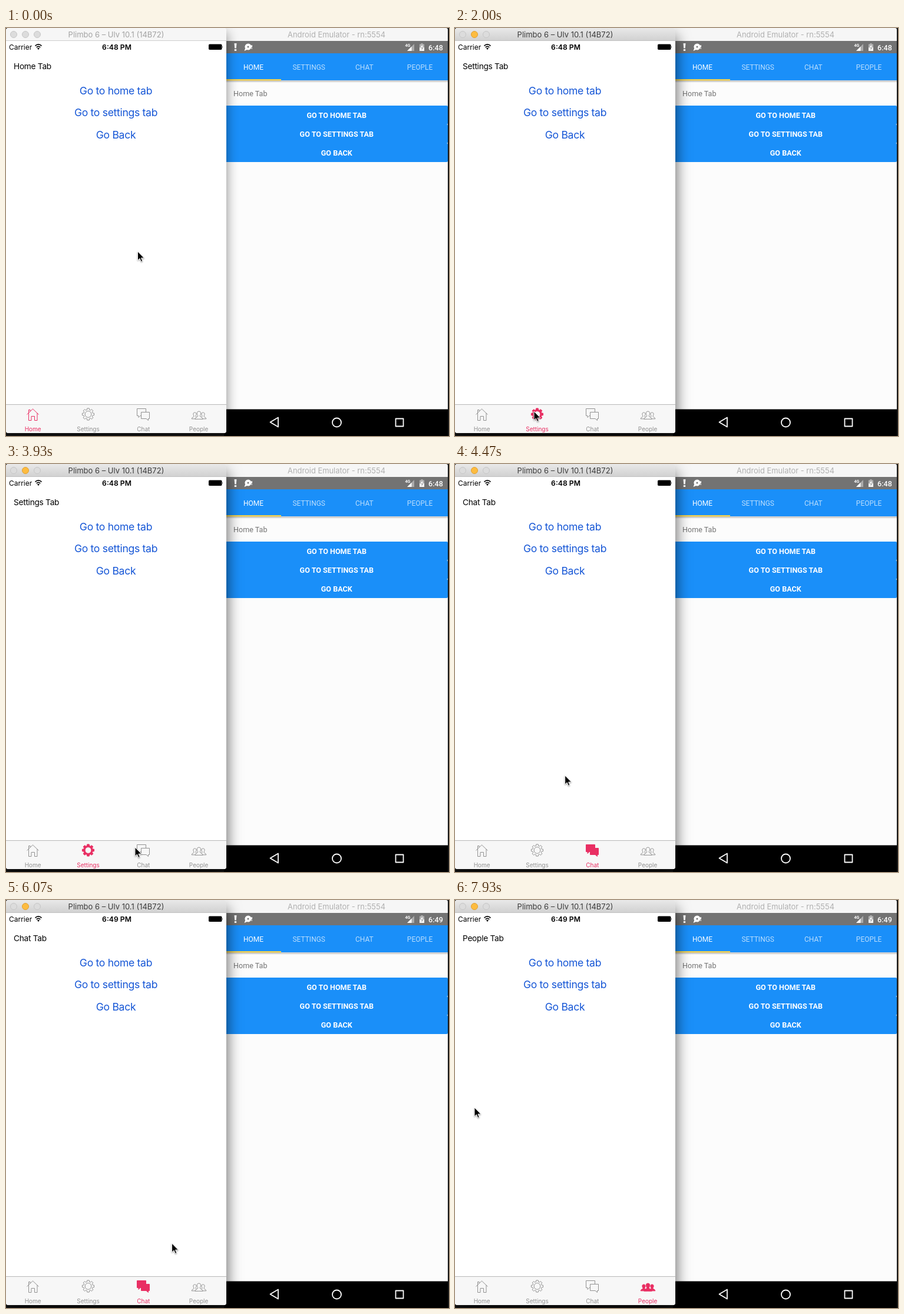
Recreate the animation shown at these times as an HTML page. Size 752x694 px, loop 8000 ms.

```html
<!DOCTYPE html>
<html lang="en">
<head>
<meta charset="utf-8">
<title>Tab navigation demo</title>
<style>
  html, body { margin: 0; width: 100%; height: 100%; overflow: hidden; background: #161616; }
  svg { display: block; width: 752px; height: 694px; font-family: Inter, sans-serif; }
  .mid { text-anchor: middle; }
  .roboto { font-family: Roboto, sans-serif; }
  .tight { letter-spacing: -.02em; }
  .link { font-size: 17.6px; fill: #1556d6; }
  .tab { fill: none; stroke: #929292; }
  .tab text { fill: #929292; stroke: none; font-size: 10px; }
  .tab.on { stroke: #e92f63; }
  .tab.on text { fill: #e92f63; }
  .tab.on .solid { fill: #e92f63; }
  .tab .hole { fill: #f7f7f7; }
  #frame { filter: drop-shadow(0 8px 10px #0007); }
  .focused #frame { filter: drop-shadow(0 14px 13px #000a); }
  #titlebar { fill: #f6f6f6; }
  .focused #titlebar { fill: url(#chrome); }
  #title { fill: #a3a3a3; }
  .focused #title { fill: #3c3c3c; }
  .light { fill: #dcdcdc; stroke: #c6c6c6; }
  .focused .minimize { fill: #fdbc40; stroke: #dfa034; }
  #cursor { filter: drop-shadow(0 1px 1px #0006); }
</style>
</head>
<body>
<svg id="stage" viewBox="0 0 752 694">
  <defs>
    <linearGradient id="chrome" x2="0" y2="1">
      <stop stop-color="#e9e9e9"/><stop offset="1" stop-color="#d0d0d0"/>
    </linearGradient>
    <linearGradient id="drop" x2="0" y2="1">
      <stop stop-opacity=".28"/><stop offset="1" stop-opacity="0"/>
    </linearGradient>
  </defs>

  <g id="android" class="roboto">
    <path fill="#f6f6f6" d="M370 0H747q3 0 3 3V22H370Z"/>
    <text class="mid" x="561" y="16" font-size="12.9" fill="#b0b0b0" font-family="Inter, sans-serif">Android Emulator - rn:5554</text>
    <path fill="#fcfcfc" d="M370 43H750V650H370Z"/>
    <path fill="#737373" d="M370 22H750V43H370Z"/>
    <path fill="#1a8ff9" d="M370 43H750V89H370Z"/>
    <path fill="#f3d24f" d="M374 87H467V89.500H374Z"/>
    <path fill="url(#drop)" d="M370 89.500H750V93H370Z"/>
    <g id="androidTabs" class="mid" font-size="12" fill="#fff"></g>
    <text x="386" y="115.500" font-size="12.600" fill="#757575">Home Tab</text>
    <g id="androidButtons" class="mid" font-size="12.600" font-weight="700"></g>
    <path d="M370 648.500H750V694H370Z"/>
    <g fill="none" stroke="#fff" stroke-width="1.800" stroke-linejoin="round">
      <path d="M448.500 670.500L462 662.500V678.500Z"/>
      <circle cx="561.500" cy="671" r="7.500"/>
      <path d="M661.500 664.500H674.500V677.500H661.500Z"/>
    </g>
    <g fill="#fff">
      <path d="M387.500 26H391.500L390.800 34.500H388.200ZM387.800 36H391.200V39H387.800Z"/>
      <path d="M411 26.500a5.500 5.500 0 1 1-2 10.600L404.500 39l1.600-4.300A5.500 5.500 0 0 1 411 26.500ZM416.500 29h1.500v4h-1.500ZM416.500 34h1.500v1.500h-1.500Z"/>
      <circle cx="411" cy="32" r="1.500" fill="#737373"/>
      <text x="677.500" y="31.500" font-size="7" font-weight="700">4G</text>
      <path fill-opacity=".4" d="M681 39L693 27V39Z"/>
      <path d="M681 39L688.500 31.500V39Z"/>
      <path fill-opacity=".45" d="M704.500 26h3v1.500h2.500V39H702V27.500h2.500Z"/>
      <path d="M702 33H710V39H702ZM707 28.500l-4 5.500h2.500v4l4-5.500H707Z"/>
      <text id="androidClock" x="717" y="37.500" font-size="12.600" font-weight="500"></text>
    </g>
  </g>

  <g id="phone">
    <rect id="frame" x="0" y="0" width="374" height="689" rx="4" fill="#fff"/>
    <path id="titlebar" d="M0 22V4q0-4 4-4H370q4 0 4 4V22Z"/>
    <path stroke="#bdbdbd" stroke-opacity=".7" d="M0 21.500H374"/>
    <circle class="light" cx="13" cy="11" r="5.500"/>
    <circle class="light minimize" cx="33" cy="11" r="5.500"/>
    <circle class="light" cx="53" cy="11" r="5.500"/>
    <text id="title" class="mid" x="187" y="16" font-size="13">Plimbo 6 – Ulv 10.1 (14B72)</text>

    <text x="5" y="36.500" font-size="12">Carrier</text>
    <g fill="none" stroke="#000" stroke-width="1.700">
      <path d="M49.500 30.300q5.500-4.800 11 0M51.700 32.800q3.300-2.900 6.600 0"/>
      <path fill="#000" stroke="none" d="M53 34.600q2-1.600 4 0L55 37Z"/>
    </g>
    <text id="phoneClock" class="mid" x="188" y="36.500" font-size="12.200" font-weight="600"></text>
    <rect x="344" y="27.500" width="22.500" height="9.500" rx="1.800"/>
    <path d="M367.300 30.500q1.500 1.800 0 3.600Z"/>

    <text id="heading" class="tight" x="13" y="69.500" font-size="13.700"></text>
    <g class="mid tight">
      <text class="link" x="186.500" y="112.500">Go to home tab</text>
      <text class="link" x="186.500" y="150">Go to settings tab</text>
      <text class="link" x="186.500" y="187.500">Go Back</text>
    </g>

    <path fill="#f7f7f7" d="M0 640H374V685q0 4-4 4H4q-4 0-4-4Z"/>
    <path stroke="#b8b8b8" d="M0 640.500H374"/>
    <g id="phoneTabs" class="mid"></g>
  </g>

  <path id="cursor" stroke="#fff" stroke-width="1" d="M0 0V15.200L3.500 12L5.900 17.500L8.300 16.500L6 11.200H11Z"/>
</svg>

<script>
const LOOP = 8000;
const FOCUS_AT = 400;
const MINUTE_AT = 5600;
const TAB_NAMES = ['Home', 'Settings', 'Chat', 'People'];
const TAB_CLICKS = [0, 1900, 4130, 6500];

// time, x, y of the pointer tip; moves are eased between stops
const POINTER = [
  [0, 223.5, 380], [350, 223.5, 380], [1000, 118, 642], [1250, 134, 652],
  [2050, 134, 652], [2750, 76, 47], [3150, 76, 47],
  [3930, 219, 652], [4250, 226, 655], [5000, 38, 57],
  [5400, 38, 57], [6250, 313, 652], [6800, 313, 646],
  [7100, 313, 646], [7930, 33, 353], [8000, 31, 335]
];

const byId = id => document.getElementById(id);

function gear(cx, cy) {
  const points = [];
  for (let tooth = 0; tooth < 8; tooth++) {
    for (const [offset, r] of [[-.27, 7.8], [-.17, 10.2], [.17, 10.2], [.27, 7.8]]) {
      const a = tooth * Math.PI / 4 + offset;
      points.push((cx + r * Math.cos(a)).toFixed(2) + ' ' + (cy + r * Math.sin(a)).toFixed(2));
    }
  }
  return `M${points.join('L')}Z`;
}

function person(x, y, scale) {
  return `<path class="solid hole" stroke-width="${1 / scale}"
    transform="translate(${x} ${y}) scale(${scale})"
    d="M0-9C3-9 4-7 3.500-4C3.200-2 2-1.500 2 0C2 2 7 2 7.500 6H-7.500C-7 2-2 2-2 0C-2-1.500-3.200-2-3.500-4C-4-7-3-9 0-9Z"/>`;
}

const icons = [
  `<path d="M35.500 657.500L45.500 648L55.500 657.500M38.500 655V667.500H43V660.500H48.500V667.500H53V655M38.500 654.500V649.500H41V652"/>`,
  `<path class="solid" d="${gear(139.5, 657)}"/><circle class="hole" cx="139.500" cy="657" r="5.400"/>`,
  `<path class="solid" d="M222.500 647.500H237.500V659.500H228L225 662.500V659.500H222.500Z"/>
   <path class="solid hole" d="M229.500 653.500H243.500V664.500H241.500V667.500L238 664.500H229.500Z"/>`,
  person(320.5, 660.5, .72) + person(334.5, 660.5, .72) + person(327.5, 660, .88)
];

byId('phoneTabs').innerHTML = TAB_NAMES.map((name, i) =>
  `<g class="tab">${icons[i]}<text x="${45.7 + 93.8 * i}" y="685.500">${name}</text></g>`).join('');

byId('androidTabs').innerHTML = TAB_NAMES.map((name, i) =>
  `<text x="${420 + 94.2 * i}" y="71" fill-opacity="${i ? .7 : 1}">${name.toUpperCase()}</text>`).join('');

byId('androidButtons').innerHTML = ['GO TO HOME TAB', 'GO TO SETTINGS TAB', 'GO BACK'].map((label, i) =>
  `<rect x="370" y="${132 + 32 * i}" width="380" height="32" rx="2" fill="#1a8ff9"/>
   <text x="561.300" y="${153 + 32 * i}" fill="#fff">${label}</text>`).join('');

const tabs = [...document.querySelectorAll('.tab')];
const ease = p => p * p * (3 - 2 * p);

function pointerAt(t) {
  const next = POINTER.findIndex(stop => stop[0] > t);
  const [t0, x0, y0] = POINTER[next - 1];
  const [t1, x1, y1] = POINTER[next];
  const p = ease((t - t0) / (t1 - t0));
  return [x0 + (x1 - x0) * p, y0 + (y1 - y0) * p];
}

function render(t) {
  const active = TAB_CLICKS.filter(click => click <= t).length - 1;
  const clock = t < MINUTE_AT ? '6:48' : '6:49';
  byId('phone').classList.toggle('focused', t >= FOCUS_AT);
  tabs.forEach((tab, i) => tab.classList.toggle('on', i === active));
  byId('heading').textContent = TAB_NAMES[active] + ' Tab';
  byId('phoneClock').textContent = clock + ' PM';
  byId('androidClock').textContent = clock;
  byId('cursor').setAttribute('transform', `translate(${pointerAt(t)})`);
}

const start = performance.now();
function tick() {
  render((performance.now() - start) % LOOP);
  requestAnimationFrame(tick);
}
tick();
</script>
</body>
</html>
```
